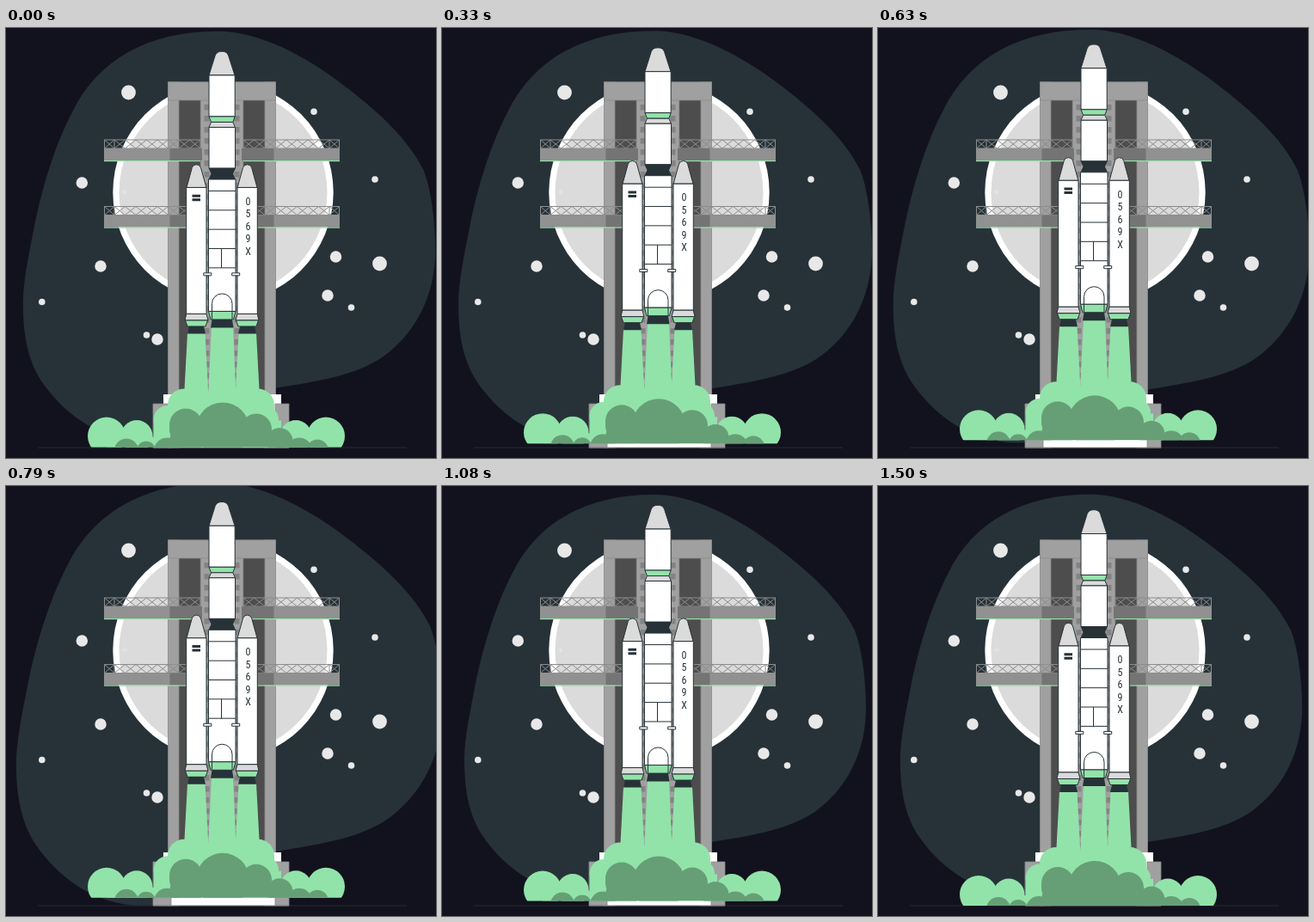
An HTML page that plays this animation: 500x500 px, repeating every 1.54 s.

```html
<!DOCTYPE html>
<html lang="en">
<head>
<meta charset="utf-8">
<title>Rocket launch</title>
<style>
html, body { margin: 0; width: 100%; height: 100%; overflow: hidden; background: #12121e; }
svg { display: block; width: 100vw; height: 100vh; }
.line { stroke: #263238; stroke-width: 1; stroke-linejoin: round; }
.white { fill: #fff; }
.grey { fill: #dbdbdb; }
.green { fill: #92e3a9; }
.dark { fill: #263238; }
.smoke { fill: #669f76; }
.steel { fill: #a0a0a0; stroke: #898989; stroke-width: .8; }
.stars { stroke: #e8e8e8; stroke-linecap: round; }
text { font: 12px "Roboto Condensed", Roboto, sans-serif; font-stretch: 75%; text-anchor: middle; fill: #263238; }
</style>
</head>
<body>
<svg viewBox="0 0 500 500" xmlns="http://www.w3.org/2000/svg">
  <defs>
    <clipPath id="floor"><rect x="80" y="400" width="330" height="88"/></clipPath>

    <g id="arm">
      <path id="truss" fill="none" stroke="#8c8c8c"/>
      <rect x="114" y="140" width="114" height="14" fill="#919191"/>
      <rect x="190.500" y="140" width="37.500" height="14" fill="#747474"/>
      <rect x="114" y="154" width="112" height="1.200" class="green"/>
    </g>

    <g id="side">
      <rect x="201" y="84" width="25" height="404" fill="#4d4d4d"/>
      <rect x="226" y="84" width="25" height="404" fill="#a0a0a0"/>
      <path d="M233.500 89V440" stroke="#838383" stroke-width="6" stroke-dasharray="6.500"/>
      <path d="M226.300 84V430" stroke="#898989"/>
      <rect x="188.500" y="63" width="12.500" height="425" class="steel"/>
    </g>

    <g id="booster">
      <path class="green" d="M211 355H231.500L235.500 430H207Z"/>
      <path class="grey line" d="M210 186L216.300 163Q217.500 159.300 221.400 159.300T226.500 163L232.900 186Z"/>
      <path class="white line" d="M209.700 186H233V333H209.700Z"/>
      <path class="grey line" d="M209.700 333H233L235 340.500H208Z"/>
      <path class="green line" d="M208.500 340.500H234.500L232 347.500H211Z"/>
      <path class="dark" d="M213 347.500H230L232 356H211Z"/>
    </g>
  </defs>

  <path id="blob" class="dark" d="M247 10C293 10 346 38 389 71C427 100 462 131 480 168C489 192 493 228 493 258C493 305 474 346 441 373C410 399 362 406 313 414C265 424 230 474 165 474C108 474 68 438 46 405C30 379 26 350 26 318C26 295 32 265 39 230C46 195 60 143 82 101C111 42 168 10 247 10Z"/>

  <g class="stars">
    <path stroke-width="16.800" d="M142.500 75h0M434.500 274h0"/>
    <path stroke-width="13.500" d="M88.300 180h0M383.500 266h0M374 311h0M110 277h0M176 362h0"/>
    <path stroke-width="7.600" d="M358 97.300h0M429 176h0M401.500 325h0M41.800 318.500h0M163.500 357h0"/>
  </g>

  <circle cx="252.500" cy="191" r="128.200" class="white"/>
  <circle cx="252.500" cy="191" r="121" class="grey"/>
  <path d="M138 187.500V194M135 190.700H141" stroke="#e8e8e8"/>

  <path d="M37 488H466" stroke="#292a33" stroke-width="1.200"/>
  <use href="#side"/>
  <use href="#side" transform="translate(502 0) scale(-1 1)"/>
  <rect x="188.500" y="62.800" width="125" height="21.200" class="steel"/>
  <rect x="183" y="426" width="137" height="62" class="white"/>
  <path d="M171 437H192V488H171ZM313 437H329V488H313Z" class="steel"/>
  <path d="M171 488H329" stroke="#777"/>

  <use href="#arm"/>
  <use href="#arm" transform="translate(502 0) scale(-1 1)"/>
  <use href="#arm" y="77.500"/>
  <use href="#arm" transform="translate(502 77.500) scale(-1 1)"/>

  <g id="rocket">
    <path class="green" d="M239 348H264L267.500 430H235Z"/>
    <path class="grey line" d="M236 55.500L243.200 32.500Q245 27.700 251 27.700T258.600 32.500L266 55.500Z"/>
    <path class="white line" d="M236 55.500H266.200V103.500H236Z"/>
    <path class="green line" d="M236 103.500H266.200L263.800 110H238.500Z"/>
    <path class="grey line" d="M238.500 110H263.800L266.500 116H236Z"/>
    <path class="white line" d="M236 116H266.500V163.500H236Z"/>
    <path class="dark" d="M235.500 163.500H267L264 170L267 176.500H235.500L238.500 170Z"/>
    <path class="white line" d="M235.500 176.500H267V330H235.500Z"/>
    <path id="seams" class="line" fill="none"/>
    <path class="green line" d="M235.500 330H267L264.500 339.500H238Z"/>
    <path class="line" fill="none" d="M239.500 339V321.200A11.700 11.700 0 0 1 263 321.200V339"/>
    <path class="dark" d="M239.500 339.500H263L264.500 349H238Z"/>
    <use href="#booster"/>
    <use href="#booster" transform="translate(502 0) scale(-1 1)"/>
    <path class="white line" d="M229.800 285.400h9v3h-9ZM262.700 285.400h9v3h-9Z"/>
    <path class="dark" d="M216.500 194.300h9.500v3h-9.500ZM216.500 198.800h9.500v3h-9.500Z"/>
    <g id="code"></g>
    <g clip-path="url(#floor)">
      <g id="light" class="green"><path d="M190 438L207 424H293L312 440V457H320V488H172V457H190ZM117 476H372V488H117Z"/></g>
      <g id="shade" class="smoke"><path d="M180 482H350V488H180ZM200 467H305V488H200Z"/></g>
    </g>
  </g>
</svg>
<script>
const $ = id => document.getElementById(id);

function add(parent, tag, attrs) {
  const el = document.createElementNS("http://www.w3.org/2000/svg", tag);
  for (const k in attrs) el.setAttribute(k, attrs[k]);
  return parent.appendChild(el);
}

// a row of round puffs on one height, given as radius by x
function puffs(id, cy, row) {
  for (const cx in row) add($(id), "circle", { cx, cy, r: row[cx] });
}
puffs("light", 475, { 117: 22, 152: 18.5, 337: 18.5, 372: 22 });
puffs("light", 456, { 188: 16.5, 301: 16 });
puffs("light", 439, { 207: 19, 293: 19 });
puffs("shade", 467, { 209: 19, 252: 31, 291: 18 });
puffs("shade", 481, { 209: 19, 318: 15.5 });
puffs("shade", 492, { 140: 14, 163: 11, 187: 15, 341: 15, 362: 13 });
puffs("shade", 462, { 209: 19 });

[..."0569X"].forEach((c, i) => {
  add($("code"), "text", { x: 281.5, y: 206.3 + i * 14.5 }).textContent = c;
});

// railing: a boxed cross, then a row of wider ones
let truss = "M114.5 130H226V140H114.5ZM126 130V140M114.5 130l11.500 10m0 -10l-11.500 10";
for (let x = 126; x < 220; x += 12.5) truss += `M${x} 130l12.5 10m0 -10l-12.5 10`;
$("truss").setAttribute("d", truss);

let seams = "M250.5 257V279.3";
for (let i = 0; i < 5; i++) seams += `M235.5 ${190 + i * 22.35}H267`;
$("seams").setAttribute("d", seams);

const LOOP = 1540, LEAD = 40;

// straight rise from a to b, straight fall from b to c
const pulse = (p, a, b, c) => Math.max(0, Math.min((p - a) / (b - a), (c - p) / (c - b)));

function draw(now) {
  const p = ((now + LEAD) % LOOP) / LOOP;
  const lift = 10 * pulse(p, 0, .5, 1);
  const s = 1 + .1 * (pulse(p, 0, .1, .3) + pulse(p, .4, .5, .6));
  $("rocket").setAttribute("transform", `translate(0 ${-lift})`);
  $("blob").setAttribute("transform", `translate(259.5 242) scale(${s}) translate(-259.5 -242)`);
}

function tick() {
  draw(performance.now());
  requestAnimationFrame(tick);
}
tick();
</script>
</body>
</html>
```
